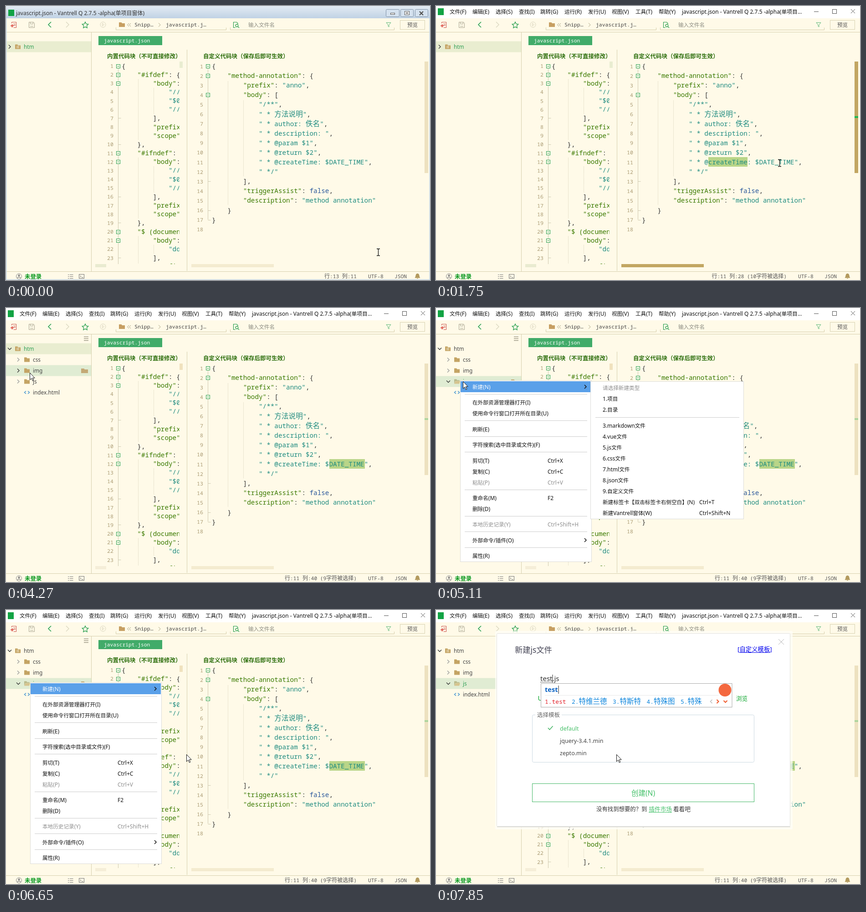
Write an HTML page that moves like this. It is 931 by 602 pixels and loops after 8 s.

```html
<!DOCTYPE html>
<html lang="zh">
<head>
<meta charset="utf-8">
<title>Code snippet editor</title>
<style>
html, body { margin: 0; width: 100%; height: 100%; overflow: hidden; background: #fffae8; }
svg { display: block; width: 100vw; height: 100vh; }
text { white-space: pre; font-family: "Noto Sans", "Noto Sans CJK SC", "Noto Sans CJK", sans-serif; }
text.mono { font-family: "Noto Sans Mono", "Noto Sans CJK SC", "Noto Sans CJK", monospace; }
</style>
</head>
<body>
<svg id="stage" viewBox="0 0 931 602"></svg>
<script>
const LOOP = 8000, STEP = 70;
const GREEN = '#2aa052', TAN = '#c4a464', BLUE = '#5aa0e9', INK = '#222';
const APP = 'Vantrell', TITLE = `javascript.json - ${APP} Q 2.7.5 -alpha(单项目`;

// Drawing helpers: each returns SVG markup
const rect = (x, y, w, h, fill, more = '') =>
  `<rect x="${x}" y="${y}" width="${w}" height="${h}" fill="${fill}" ${more}/>`;
const path = (d, stroke, width = 1, fill = 'none', more = '') =>
  `<path d="${d}" stroke="${stroke}" stroke-width="${width}" fill="${fill}" ${more}/>`;
const group = (id, body, more = '') => `<g id="${id}" ${more}>${body}</g>`;
const runs = (s, cjk) =>
  s.replace(/[\u3000-\u9fff\uff00-\uffef]+/g, m => `<tspan font-size="${cjk}">${m}</tspan>`);
const text = (x, y, s, fill = INK, size = 12, cjk = size * 0.968, more = '') =>
  `<text x="${x}" y="${y}" fill="${fill}" font-size="${size}" ${more}>${runs(s, cjk)}</text>`;
const mono = (x, y, s, fill, size = 11.3, cjk = 12, more = '') =>
  text(x, y, s, fill, size, cjk, `class="mono" ${more}`);
const right = (x, y, color, w = 1.3) => path(`M${x - 2} ${y - 4}l4 4-4 4`, color, w);
const down = (x, y, color, w = 1.3) => path(`M${x - 4} ${y - 2}l4 4 4-4`, color, w);
const folder = (x, y, w = 12, fill = TAN) =>
  path(`M${x} ${y - 5}h${w * 0.42}l1.5 2H${x + w}v8H${x}z`, 'none', 0, fill);

const CHAR = 8.588;
function code(x, y, line) {
  const body = line.trimStart();
  const spans = body.match(/"[^"]*"|\w+|[^"\w]+/g).map((tok, i, all) => {
    const color = tok[0] !== '"' ? (/^\w/.test(tok) ? '#28579b' : '#333')
      : (all[i + 1] || '')[0] === ':' ? '#3a7a00' : '#1f8c80';
    return `<tspan fill="${color}">${runs(tok, 15.6)}</tspan>`;
  }).join('');
  return `<text class="mono" font-size="14.31" x="${x + (line.length - body.length) * CHAR}" y="${y}">${spans}</text>`;
}

function pane(lines, o) {
  const cy = n => o.y + o.lead * (n - 1);
  let s = path(`M${o.fold} ${o.y + 5}V${o.end}`, '#cfcab0');
  for (const [x, a, b] of o.guides)
    s += path(`M${x + .5} ${cy(a) - 9}V${Math.min(cy(b) + 10, 566)}`, '#d3ceb6', 1, 'none', 'stroke-dasharray="1 1"');
  for (const n of o.ticks) s += path(`M${o.fold} ${Math.round(cy(n)) + .5}h6`, '#cfcab0');
  lines.forEach((l, i) => {
    const y = cy(i + 1);
    s += mono(o.num, y + 4.5, String(i + 1), '#ab9c74', 11.6, 12, 'text-anchor="end"');
    if (l) s += code(o.x, y + 5, l);
  });
  for (const n of o.boxes) {
    const y = Math.round(cy(n)) - 3.5;
    s += rect(o.fold - 4, y, 8, 8, '#fffae8', `stroke="${GREEN}"`) + path(`M${o.fold - 2} ${y + 4}h4`, GREEN);
  }
  return s;
}

const block = name => [`    "${name}": {`, '        "body": [', '            "// #ifdef",', '            "$0",',
  '            "// #endif"', '        ],', '        "prefix": "ifdef",', '        "scope": "source"', '    },'];
const builtIn = ['{', ...block('#ifdef'), ...block('#ifndef'), '    "$ (document)": {', '        "body": [',
  '            "document"', '        ],', '        "prefix": "doc",'];
const custom = ['{', '    "method-annotation": {', '        "prefix": "anno",', '        "body": [',
  ...['/**', ' * 方法说明', ' * author: 佚名', ' * description: ', ' * @param $1', ' * @return $2',
    ' * @createTime: $DATE_TIME'].map(s => `            "${s}",`), '            " */"',
  '        ],', '        "triggerAssist": false,', '        "description": "method annotation"', '    }', '}', ''];

function editors() {
  return `<clipPath id="leftClip"><rect x="188" y="96" width="192.5" height="471"/></clipPath>`
    + rect(203, 66, 140, 20, '#41ab69') + mono(215, 80, 'javascript.json', '#fff', 11.25)
    + path('M397.5 96V582', '#d6d0ae')
    + text(222, 115, '内置代码块（不可直接修改）', '#2c6e0c', 12.5, 12.5, 'font-weight="700"')
    + text(433, 115, '自定义代码块（保存后即可生效）', '#2c6e0c', 12.5, 12.5, 'font-weight="700"')
    + `<g clip-path="url(#leftClip)">` + pane(builtIn, { x: 254, y: 131.5, lead: 19.16, fold: 246.5, num: 236, end: 567,
      guides: [[290, 3, 9], [290, 12, 18], [290, 21, 24], [324, 4, 6], [324, 13, 15], [324, 22, 22]],
      ticks: [7, 10, 16, 19, 23], boxes: [1, 2, 3, 11, 12, 20, 21] }) + '</g>'
    + rect(598, 332, 86, 21, '#b9d588', 'id="selA"') + rect(710, 332, 78, 21, '#b9d588', 'id="selB"')
    + pane(custom, { x: 452, y: 132, lead: 21.1, fold: 443.5, num: 433, end: 469.5,
      guides: [[487, 3, 15], [521, 5, 12]], ticks: [13, 16, 17], boxes: [1, 2, 4] })
    + rect(787, 332, 1, 21, INK, 'id="caret"')
    + rect(381, 122, 7, 14, '', 'id="barLV"') + rect(196, 567, 24, 7, '', 'id="barLH"')
    + rect(919, 122, 8, 245, '#c2a662', 'id="barV"') + rect(407, 567, 181, 7, '#c2a662', 'id="barH"')
    + rect(919, 242, 8, 4, '#1fb851', 'id="mark"');
}

function toolbar() {
  return path('M0 57.5H931M187.5 57V583M0 583.5H931', '#d6d0ae')
    + path('M12.5 38v-2.5h10v12h-6M16 39.5h5M16 42.5h5', '#c8504a') + path('M10 43.5h7M13.5 40v7', '#d8352e', 1.6)
    + path('M50.5 35.5h10l2 2v10h-12zM53.5 35.5v4h6v-4M53 44.5h7', '#a9a590')
    + path('M99 35l-6 6 6 6', GREEN, 1.6) + path('M132 35l6 6-6 6', '#d9d5be', 1.3)
    + path('M174 35l2.1 4.3 4.7.7-3.4 3.3.8 4.7-4.2-2.2-4.2 2.2.8-4.7-3.4-3.3 4.7-.7z', GREEN, 1.3)
    + '<circle cx="213" cy="41" r="6" fill="none" stroke="#d9d5be"/>' + path('M211.5 38l4 3-4 3z', '#d9d5be')
    + path('M241.5 47v5.500H483.500v-5M492.500 47v5.500H852.500v-5', '#d3cca8')
    + folder(248, 41, 13, '#c79f62') + path('M270 38l-3.500 3.500 3.500 3.500M274 38l-3.500 3.500 3.500 3.500', '#a39a78')
    + mono(282, 45, 'Snipp…', '#444', 11.6) + right(337, 41.5, '#a39a78', 1) + mono(351, 45, 'javascript.j…', '#444', 11.4)
    + path('M504 47.500h-4.500v-12h7l2.500 2.500v2', GREEN, 1.2)
    + '<circle cx="507" cy="43" r="2.800" fill="none" stroke="#2aa052" stroke-width="1.300"/>' + path('M509 45l3 3', GREEN, 1.3)
    + text(532, 46, '输入文件名', '#8b8b80', 12, 11.6)
    + path('M835 36.500h10l-4 5v4.500l-2-1.500v-3z', '#5fb87b')
    + rect(865.5, 31.5, 54, 20, 'none', 'stroke="#d8d2b2"') + text(881, 46, '预览', '#555');
}

function statusBar() {
  return '<circle cx="28.500" cy="594" r="6" fill="none" stroke="#888"/><circle cx="28.500" cy="592" r="2.200" fill="#888"/>'
    + path('M24.500 598q4-5 8 0', '#888', 1.5) + text(41, 598.5, '未登录', '#0c9a22', 12.5, 12.4, 'font-weight="700"')
    + path('M136 590.500h2.500M136 594.500h2.500M136 598.500h2.500M140 590.500h7.500M140 594.500h7.500M140 598.500h7.500', '#777')
    + rect(160.5, 589.5, 11, 9, 'none', 'stroke="#777"') + path('M162.500 592l2.500 2-2.500 2M166 596.500h3.500', '#777')
    + group('status', '') + mono(795, 598, 'UTF-8', '#555', 11.3) + mono(853, 598, 'JSON', '#555', 11.3)
    + path('M898 597q2-1.500 2-5 0-3.500 3.500-4 3.500.5 3.500 4 0 3.500 2 5zM902 598.500h3', '#b39a5e', 1, '#b39a5e');
}

function aeroBar() {
  const button = (x, w, glyph) => rect(x + .5, 7.5, w, 16, '#d5e2ef', 'rx="2" stroke="#7e91a6"') + glyph;
  return '<linearGradient id="sky" x2="0" y2="1"><stop stop-color="#e3ebf3"/><stop offset="1" stop-color="#c0d2e4"/></linearGradient>'
    + rect(0, 0, 931, 27, 'url(#sky)') + path('M.75 27V601.250H930.250V27', '#cbdbea', 1.5)
    + rect(5, 8, 13, 14, '#12a344') + text(22, 20, TITLE + '窗体)', '#333', 12, 12)
    + button(834, 29, rect(844.5, 15.5, 9, 3, '#fff', 'stroke="#555"'))
    + button(866, 28, rect(875.5, 11.5, 10, 8, '#fff', 'stroke="#555"') + rect(878.5, 14.5, 4, 2, '#fff', 'stroke="#555"'))
    + button(898, 28, path('M908 12l8 8M916 12l-8 8', '#555', 2.4));
}

function flatBar() {
  const menus = [[30, '文件(F)'], [80, '编辑(E)'], [131, '选择(S)'], [182, '查找(I)'], [229, '跳转(G)'],
    [282, '运行(R)'], [334, '发行(U)'], [386, '视图(V)'], [438, '工具(T)'], [489, '帮助(Y)']];
  return rect(0, 0, 931, 27, '#fff') + rect(4, 5, 13, 15, '#12a344')
    + menus.map(([x, s]) => text(x, 16.5, s, '#111')).join('') + text(540, 16.5, TITLE + '...', '#111', 12, 11.8)
    + path('M830 12.500h10M911 7l9 9M920 7l-9 9', '#555') + rect(870.5, 7.5, 9, 9, 'none', 'stroke="#555"');
}

function tree({ open, picked, hover }) {
  const names = ['htm', 'css', 'img', 'js', 'index.html'], sel = picked ? 3 : 0;
  return names.slice(0, open ? 5 : 1).map((name, i) => {
    const y = 89.5 + 24 * i, x = i ? 27 : 8, on = i === sel, hot = i === hover;
    const dark = hot || !i || on ? '#333' : '#999';
    let s = hot || (on && picked) ? rect(0, y - 12, 187, 24, '#e0ecd3') : on ? rect(0, y - 12, 187, 24, '#e9edd0') : '';
    if (i < 4) s += (open && !i) || (picked && i === 3) ? down(x, y, dark) : right(x, y, dark);
    if (i === 4) s += path('M44 182.500l-3.500 3 3.500 3M48 182.500l3.500 3-3.500 3', '#3b8fd0', 1.4);
    else if (picked && i === 3) s += path(`M40 ${y + 5}v-10h5l1.500 2h5v2h-9z`, 'none', 0, '#b9b98a') + path(`M43 ${y - 1}h10l-2 6H40z`, 'none', 0, '#d6c48e');
    else s += folder(i ? 40 : 20, y);
    if (!i) s += path('M23 88.500h6M23 91.500h6', '#fffae8');
    if (hot && i && i < 4) s += folder(165, y + .5, 15, '#c4a976');
    return s + text(i ? 59 : 39, y + 4.5, name, on ? '#2f9f55' : '#444', 11.8);
  }).join('');
}

const mainItems = [[173, '新建(N)'], [207, '在外部资源管理器打开(I)'], [231, '使用命令行窗口打开所在目录(U)'], [266, '刷新(E)'],
  [300, '字符搜索(选中目录或文件)(F)'], [335, '剪切(T)', 'Ctrl+X'], [359, '复制(C)', 'Ctrl+C'], [383, '粘贴(P)', 'Ctrl+V', 1],
  [417, '重命名(M)', 'F2'], [441, '删除(D)'], [475, '本地历史记录(Y)', 'Ctrl+Shift+H', 1], [510, '外部命令/插件(O)'], [544, '属性(R)']];
const subItems = [[175, '请选择新建类型', '', 1], [199, '1.项目'], [223, '2.目录'], [258, '3.markdown文件'], [282, '4.vue文件'],
  [306, '5.js文件'], [330, '6.css文件'], [354, '7.html文件'], [378, '8.json文件'], [402, '9.自定义文件'],
  [426, '新建标签卡【双击标签卡右侧空白】(N)', 'Ctrl+T'], [450, `新建${APP}窗体(W)`, 'Ctrl+Shift+N']];
const entries = (items, x, keyX, hot) => items.map(([y, label, key, dim]) => {
  const color = y === hot ? '#fff' : dim ? '#8e8e8e' : '#111';
  return text(x, y + 4.5, label, color) + (key ? text(keyX, y + 4.5, key, color) : '');
}).join('');

function mainMenu() {
  return '<clipPath id="treeClip"><rect x="0" y="58" width="187" height="524"/></clipPath>'
    + rect(53.5, 159.5, 288, 398, '#fff', 'stroke="#dcdcd8"') + rect(54, 161, 286, 24, BLUE)
    + [190, 248, 283, 317, 400, 458, 492, 527].map(y => path(`M63 ${y - .5}H332`, '#cdcdcd')).join('')
    + entries(mainItems, 80, 245, 173) + right(328, 173, '#111', 1.5) + right(328, 510, '#111', 1.5);
}

function subMenu(tip) {
  const row = tip.x > 340 && subItems.find(([y,,, dim]) => !dim && Math.abs(y - tip.y) <= 12);
  return rect(339.5, 161.5, 336, 302, '#fff', 'stroke="#dcdcd8"') + path('M350 240.500H666', '#cdcdcd')
    + (row ? rect(340, row[0] - 12, 336, 24, BLUE) : '') + entries(subItems, 366, 578, row && row[0]);
}

function dialog() {
  return rect(130, 46, 653, 436, '#fffef8', 'rx="3" opacity=".75"') + rect(133.5, 51.5, 644, 424, '#fff', 'stroke="#e2e2de" rx="2"')
    + path('M134 476.500H778', '#cfcfcb') + path('M752 64l12 12M764 64l-12 12', '#b5b5b5')
    + text(173, 93.5, '新建js文件', '#445', 17.3, 17.3)
    + text(662, 91, '[自定义模板]', '#00e', 13.4, 13.4) + path('M666 93.500H733', '#00e')
    + group('field', '')
    + '<clipPath id="pathClip"><rect x="223" y="180" width="400" height="26"/></clipPath><g clip-path="url(#pathClip)">'
    + text(616, 199, `C:/Users/Accountholder/Documents/${APP}Projects/htm/js`, '#0ca52c', 14.67, 14.67, 'text-anchor="end"') + '</g>'
    + path('M638 192.500h6l-3 3z', 'none', 0, '#0ca52c') + text(659, 198.5, '浏览', '#0ca52c', 12.6, 12.6)
    + rect(211.5, 230.5, 487, 104, 'none', 'rx="3" stroke="#ccd9e2"') + rect(218, 226, 58, 9, '#fff')
    + text(222, 234.5, '选择模板', '#666', 12.5, 12.5) + path('M246 259l3.500 4 7-8', '#38b05a', 1.4)
    + text(272, 265, 'default', '#47c069', 12.5) + text(272, 292, 'jquery-3.4.1.min', '#444', 12.5) + text(272, 319, 'zepto.min', '#444', 12.5)
    + rect(211.5, 381.5, 487, 40, '#fff', 'stroke="#43b766"') + text(455, 408, '创建(N)', '#43c069', 15.5, 15.5, 'text-anchor="middle"')
    + text(352, 442, '没有找到想要的？到', '#333', 12.4, 12.4) + text(467.5, 442, '插件市场', '#43c069', 12.6, 12.6)
    + path('M467 444.500H518', '#43c069') + text(521, 442, '看看吧', '#333', 12.6, 12.6);
}

const candidates = {
  t: ['他', '她', '它', '天', '听'], te: ['特', '忑', '忒', '铽', '慝'],
  tes: ['特色', '特殊', '特使', '特赦', '特设'], test: ['test', '特维兰德', '特斯特', '特殊图', '特殊']
};
const wide = { t: .361, e: .564, s: .479 }, bold = { t: .434, e: .59, s: .497 };
const measure = (s, table, size) => [...s].reduce((w, c) => w + table[c] * size, 0);

function field(typed, caretOn) {
  if (!typed) return rect(229, 141, 57, 19, '#3594fb') + text(229, 156, '<tspan fill="#fff">new_file</tspan>.js', '#333', 15)
    + (caretOn ? rect(285, 141, 1, 19, INK) : '');
  const end = 229 + measure(typed, wide, 15);
  return text(229, 156, typed + '.js', '#333', 15) + path(`M229 158.500H${end}`, '#333', 1, 'none', 'stroke-dasharray="2 1"')
    + rect(end, 142, 1, 18, INK);
}

function inputPopup(typed) {
  if (!typed) return '';
  let x = 239, list = '';
  candidates[typed].forEach((word, i) => {
    list += mono(x, 206, `${i + 1}.${word}`, i ? '#0b84dc' : '#e3222a', 12.92, 15.5);
    x += 15.5 + word.length * (word[0] < '~' ? 7.75 : 15.5) + 12.5;
  });
  const end = x - 12.5 + 67;
  return rect(230.5, 161.5, end - 231, 52, '#fff', 'stroke="#a9a9a9"') + path(`M239 187.500H${end - 30}`, '#e8e8e8')
    + text(239, 180, typed, '#0a62c4', 14.6, 14.6, 'font-weight="700"') + rect(240 + measure(typed, bold, 14.6), 166, 1, 18, INK) + list
    + path(`M${end - 44} 197l-4 4 4 4`, '#bbb', 1.5) + path(`M${end - 34} 197l4 4-4 4`, '#f0592b', 2) + path(`M${end - 19} 199l4 4 4-4`, '#f0592b', 2)
    + `<circle cx="${end - 16}" cy="176" r="14" fill="#f4683f"/>`;
}

const pointer = path('M.5.5v15.500l3.600-3.400 2.400 5.600 2.300-1-2.400-5.400h4.800z', '#111', 1, '#fff');
const beam = path('M-3.500-7.500h2.500l1 1 1-1h2.500M0-6.500V6.500M-3.500 7.500h2.500l1-1 1 1h2.500', '#111', 1.3);

// Mouse track: time, x, y
const track = [[0, 817, 541], [350, 738, 430], [840, 639, 345], [1400, 639, 345], [1610, 690, 352], [1750, 754, 345],
  [2450, 754, 345], [2800, 400, 240], [3220, 5, 84], [3290, 5, 84], [3850, 52, 131], [3920, 52, 131], [3990, 52, 138],
  [4200, 52, 138], [4270, 52, 142], [4410, 52, 151], [4760, 52, 151], [4830, 41, 146], [4900, 41, 146], [4970, 53, 159],
  [5110, 59, 161], [5740, 345, 176], [5950, 394, 280], [6020, 400, 305], [6160, 401, 327], [6370, 396, 317]];
function mouseAt(t) {
  const i = track.findIndex(p => p[0] > t);
  if (i < 0) { const [, x, y] = track[track.length - 1]; return { x, y }; }
  const [a, ax, ay] = track[i - 1], [b, bx, by] = track[i], k = (t - a) / (b - a);
  return { x: Math.round(ax + (bx - ax) * k), y: Math.round(ay + (by - ay) * k) };
}

const stage = document.getElementById('stage');
stage.innerHTML = rect(0, 0, 931, 602, '#fffae8') + group('tree', '')
  + path('M171 63.500h10M171 67.500h10M171 71.500h10', '#77735f', 1, 'none', 'id="burger"')
  + editors() + toolbar() + statusBar() + group('menu', mainMenu()) + group('sub', '')
  + group('flat', flatBar()) + group('aero', aeroBar()) + group('dialog', dialog()) + group('popup', '')
  + group('beam', beam) + group('pointer', pointer);

const $ = id => document.getElementById(id);
const cache = {};
const paint = (id, html) => { if (cache[id] !== html) $(id).innerHTML = cache[id] = html; };
const show = (id, on) => $(id).style.display = on ? '' : 'none';
const within = (t, a, b) => t >= a && t < b;
const ramp = (t, a, b) => Math.max(0, Math.min(1, (t - a) / (b - a)));

function draw(t) {
  const q = Math.floor(t / STEP) * STEP, tip = mouseAt(q);
  const selA = within(t, 1120, 1890), selB = t >= 2030;

  const aero = t < 910 || within(t, 6860, 6930);
  show('aero', aero);
  show('flat', !aero);

  const open = t >= 3360, picked = t >= 4550;
  const row = Math.floor((tip.y - 77.5) / 24);
  const hover = picked ? (t < 6930 ? 3 : -1) : open && row > 0 ? row : -1;
  paint('tree', tree({ open, picked, hover }));
  show('burger', within(t, 3010, 6720));

  show('selA', selA);
  show('selB', selB);
  show('caret', within(t, 2170, 2380));
  show('mark', selA || selB);
  const glow = ramp(q, 0, 350) * (1 - ramp(q, 2800, 3220));
  $('barV').style.opacity = .3 + .7 * glow;
  $('barH').style.opacity = .18 + .82 * glow;
  $('mark').style.opacity = .3 + .7 * glow;
  $('barLV').setAttribute('fill', t < 2800 ? '#e9edd1' : '#f0e2be');
  $('barLH').setAttribute('fill', t < 2800 ? '#e9ebd0' : '#f5eed8');

  const place = t < 910 ? '行:13 列:11' : t < 1120 ? '行:11 列:23' : selA ? '行:11 列:28 (10字符被选择)'
    : selB ? '行:11 列:40 (9字符被选择)' : '行:11 列:36';
  paint('status', mono(770, 598, place, '#555', 11.2, 12, 'text-anchor="end"'));

  show('menu', within(t, 4970, 6930));
  $('menu').setAttribute('clip-path', t >= 6720 ? 'url(#treeClip)' : 'none');
  paint('sub', within(t, 5110, 6650) ? subMenu(tip) : '');

  const typed = t < 7430 ? '' : t < 7500 ? 't' : t < 7710 ? 'te' : t < 7850 ? 'tes' : 'test';
  show('dialog', t >= 6860);
  paint('field', field(typed, t < 7290));
  paint('popup', inputPopup(typed));

  const isBeam = t < 3000 && tip.x > 187;
  show('beam', isBeam);
  show('pointer', !isBeam);
  $(isBeam ? 'beam' : 'pointer').setAttribute('transform', `translate(${tip.x + (isBeam ? .5 : 0)} ${tip.y})`);
}

const start = performance.now();
function tick() {
  draw((performance.now() - start) % LOOP);
  requestAnimationFrame(tick);
}
tick();
</script>
</body>
</html>
```
